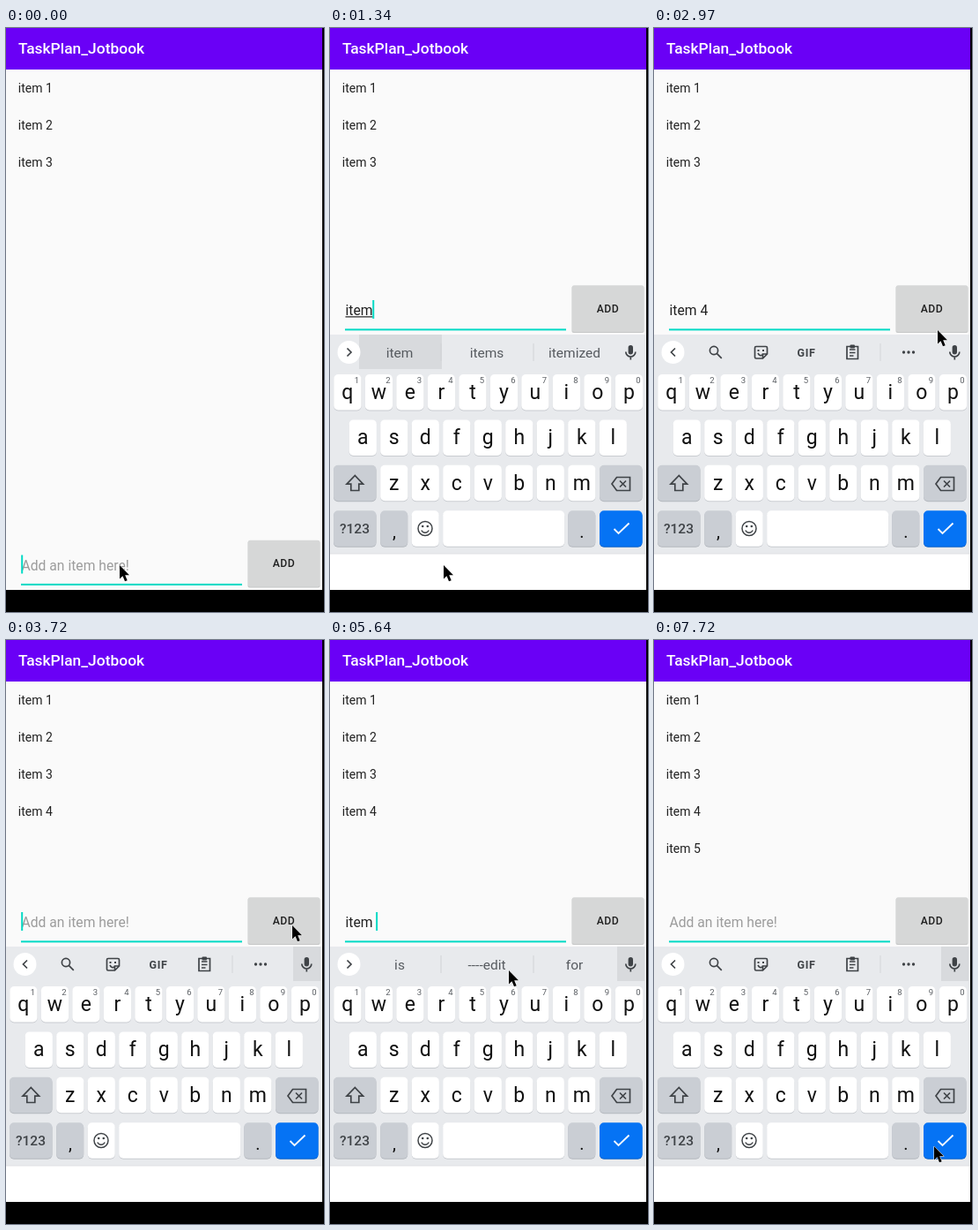
An HTML page that plays this animation: 361 px wide and 661 px high, repeating every 8 s.

```html
<!DOCTYPE html>
<html lang="en">
<head>
<meta charset="utf-8">
<title>Todo list</title>
<style>
  html, body { margin: 0; width: 100%; height: 100%; overflow: hidden; background: #000; }
  svg { display: block; width: 361px; height: 661px; font-family: Roboto, sans-serif; }
  text { white-space: pre; }
  .mid { text-anchor: middle; }
  .line { fill: none; stroke: #3f4347; stroke-width: 1.7; }
</style>
</head>
<body>
<svg id="stage" viewBox="0 0 361 661"></svg>
<script>
const LOOP = 8000;
const stage = document.getElementById('stage');

// Each step changes part of the app state and holds until the next one.
const start = { rows: 3, text: '', mark: 0, words: null, caret: true, keys: false, pick: false, mic: false };
const NEXT = ['is', '----edit', 'for'];
const IT = ['it', "it's", 'if'];
const ITE = ['ite', 'item', "it's"];
const ITEM = ['item', 'items', 'itemized'];
const steps = [
  [150, { keys: true, text: 'i', mark: 1, words: IT, pick: true }],
  [290, { text: 'it', mark: 2 }],
  [440, { text: 'ite' }],
  [740, { mark: 3, words: ITE }],
  [1040, { text: 'item' }],
  [1340, { mark: 4, words: ITEM }],
  [1490, { text: 'item ' }],
  [1640, { mark: 0, words: NEXT }],
  [2240, { text: 'item 4' }],
  [2830, { words: null, pick: false, caret: false }],
  [3420, { rows: 4, text: '', caret: true, mic: true }],
  [4010, { caret: false }],
  [4460, { text: 'i', caret: true }],
  [4750, { text: 'it', mark: 2, words: IT }],
  [4900, { text: 'ite', mark: 3, words: ITE }],
  [5040, { text: 'item' }],
  [5190, { mark: 4, words: ITEM }],
  [5340, { text: 'item ' }],
  [5640, { mark: 0, words: NEXT }],
  [6090, { caret: false }],
  [6390, { text: 'item 5', caret: true }],
  [6830, { words: null }],
  [6980, { caret: false }],
  [7120, { rows: 5, text: '', caret: true }],
  [7720, { caret: false }]
];

// Pointer samples: time, x, y
const moves = [
  [0, 129, 608], [2240, 144, 605], [2380, 184, 562], [2530, 245, 474],
  [2680, 298, 388], [2830, 322, 342], [2980, 329, 326], [3120, 325, 323],
  [3860, 272, 346], [4010, 203, 374], [6540, 222, 363], [6690, 265, 341],
  [6830, 297, 322], [6980, 304, 318], [7270, 310, 352], [7420, 316, 433],
  [7570, 320, 520], [7720, 318, 573]
];

const rect = (x, y, w, h, fill, r = 0, more = '') =>
  `<rect x="${x}" y="${y}" width="${w}" height="${h}" rx="${r}" fill="${fill}" ${more}/>`;
const label = (s, x, y, size, fill, more = '') =>
  `<text x="${x}" y="${y}" font-size="${size}" fill="${fill}" ${more}>${s}</text>`;
const mid = (s, x, y, size, fill, more = '') => label(s, x, y, size, fill, 'class="mid" ' + more);
const line = (d, more = '') => `<path class="line" d="${d}" ${more}/>`;

const key = (x, y, w, fill = '#fff', shade = '#c9ccd1') =>
  rect(x, y + 1, w, 40.5, shade, 5) + rect(x, y, w, 40.5, fill, 5);

function letterRow(chars, x, row) {
  const y = 392 + row * 51.4;
  return [...chars].map((c, i) => {
    const cx = x + i * 35.5;
    const digit = row ? '' : mid((i + 1) % 10, cx + 10.4, 402, 9.5, '#5a5e63');
    return key(cx - 15.6, y, 31.2) + mid(c, cx, y + 27.8, 23, '#111') + digit;
  }).join('');
}

function keyboard() {
  const soft = '#caced4', dark = '#b4b8be', ink = '#3f4347';
  return rect(0, 347, 359, 248, '#e8eaed') +
    rect(0, 595, 359, 41, '#fff') + rect(0, 594.5, 359, 1, '#dfe1e4') +
    rect(33, 347, 94, 39, '#d8dadd', 0, 'id="pick"') +
    rect(326, 347, 31, 39, '#d8dadd', 0, 'id="mic"') +
    '<circle cx="21.5" cy="367" r="13" fill="#fff"/>' +
    line('', 'id="chevron"') +
    // suggestions
    '<g id="words">' + rect(125.5, 357, 1, 20, '#cfd2d6') + rect(230.5, 357, 1, 20, '#cfd2d6') +
    [79, 178, 277.5].map(x => mid('', x, 373, 15.5, '#565a5f')).join('') + '</g>' +
    // toolbar
    '<g id="tools"><circle class="line" cx="68" cy="365" r="4.6"/>' + line('M71.3 368.3l5.5 5.5') +
    line('M116 360.5h11q1.5 0 1.5 1.5v7l-5 5h-7.500q-1.500 0-1.500-1.500v-10.500q0-1.500 1.500-1.500zM128 369h-4.500v4.500M118 368q2 4 5 2') +
    '<path d="M117.500 364h2v2h-2zM123 364h2v2h-2z" fill="#3f4347"/>' +
    mid('GIF', 173, 371.5, 12.5, ink, 'font-weight="700" letter-spacing=".6"') +
    line('M219 360.500h12.500v14h-12.500zM222 364h6.500M222 367.500h6.500M222 371h4.500') +
    rect(222.5, 358.5, 5.5, 4, ink, 1) + rect(256.5, 357, 1, 20, '#d3d6da') +
    [283.5, 289, 294.5].map(x => `<circle cx="${x}" cy="367" r="1.7" fill="${ink}"/>`).join('') + '</g>' +
    // microphone
    rect(338.6, 359, 5.4, 10.5, ink, 2.7) + line('M335.800 366.500a5.500 5.500 0 0 0 11 0M341.300 372v3.500') +
    letterRow('qwertyuiop', 19.9, 0) + letterRow('asdfghjkl', 37.3, 1) + letterRow('zxcvbnm', 72.8, 2) +
    key(4, 494.8, 48.5, soft, dark) + line('M28.300 506.500l-9.300 9.700h4.800v7.300h9v-7.300h4.800z') +
    key(306, 494.8, 48.5, soft, dark) + line('M325.500 508.500h15v15h-15l-5.500-7.500zM329 512.500l7 7M336 512.500l-7 7') +
    key(4, 546.2, 48.5, soft, dark) + mid('?123', 28, 572, 15.5, ink, 'font-weight="500"') +
    key(57.2, 546.2, 31, soft, dark) + mid(',', 73, 577, 20, '#111') +
    key(92.7, 546.2, 31) + '<circle class="line" cx="108" cy="566.500" r="8" style="stroke-width:1.500"/>' +
    '<circle cx="105.200" cy="564" r="1.300" fill="#3f4347"/><circle cx="110.800" cy="564" r="1.300" fill="#3f4347"/>' +
    line('M103.800 568.500a4.600 4.600 0 0 0 8.400 0', 'style="stroke-width:1.400"') +
    key(128.2, 546.2, 138) +
    key(270.3, 546.2, 31, soft, dark) + mid('.', 286, 577, 20, '#111') +
    key(306, 546.2, 48.5, '#0573f4', '#075fc6') +
    '<path d="M322.500 567l5 5 12-11.500" fill="none" stroke="#fff" stroke-width="1.800"/>';
}

stage.innerHTML =
  rect(0, 0, 361, 661, '#000') + rect(0, 0, 359, 636, '#fafafa') + rect(0, 0, 359, 47, '#6a00f6') +
  label('TaskPlan_Jotbook', 14, 29, 17.4, '#fff', 'font-weight="500"') +
  '<g id="rows">' + [1, 2, 3, 4, 5].map(n => label('item ' + n, 13.8, 31 + n * 42, 14, '#212121')).join('') + '</g>' +
  '<g id="keys">' + keyboard() + '</g>' +
  '<g id="form">' +
  label('', 17.5, 325, 15.7, '#212121', 'id="field"') +
  rect(17.5, 326.3, 0, 1.2, '#212121', 0, 'id="mark"') +
  rect(17, 340.4, 251, 2, '#03dac5') +
  rect(0, 308, 2, 21, '#03dac5', 0, 'id="caret"') +
  rect(274.5, 292, 82, 53, '#c6c7c7', 2) + rect(275, 291.3, 81, 52.7, '#d6d7d7', 2) +
  mid('ADD', 315.5, 321.6, 12.2, '#212121', 'font-weight="500" letter-spacing=".5"') + '</g>' +
  '<path id="pointer" d="M0 0v15.500l3.500-3.200 2.500 6 2.700-1.100-2.500-5.900h4.800z" fill="#000" stroke="#fff" stroke-width="1" paint-order="stroke"/>';

const ui = {};
stage.querySelectorAll('[id]').forEach(el => { ui[el.id] = el; });
const wordEls = ui.words.querySelectorAll('text');
const pen = document.createElement('canvas').getContext('2d');
pen.font = '15.7px Roboto, sans-serif';
const widthOf = s => pen.measureText(s).width;
const show = (el, on) => el.setAttribute('display', on ? 'inline' : 'none');

function draw(t) {
  const s = Object.assign({}, start);
  for (const [at, change] of steps) if (at <= t) Object.assign(s, change);

  [...ui.rows.children].forEach((el, i) => show(el, i < s.rows));
  show(ui.keys, s.keys);
  show(ui.pick, s.pick);
  show(ui.mic, s.mic);
  show(ui.words, s.words);
  show(ui.tools, !s.words);
  if (s.words) wordEls.forEach((el, i) => { el.textContent = s.words[i]; });
  ui.chevron.setAttribute('d', s.words ? 'M19.500 362.500l4.500 4.500-4.500 4.500' : 'M24 362.500l-4.500 4.500 4.500 4.500');

  ui.form.setAttribute('transform', `translate(0 ${s.keys ? 0 : 288.5})`);
  ui.field.textContent = s.text || 'Add an item here!';
  ui.field.setAttribute('fill', s.text ? '#212121' : '#9c9c9c');
  ui.mark.setAttribute('width', widthOf(s.text.slice(0, s.mark)));
  ui.caret.setAttribute('x', 17.2 + widthOf(s.text));
  show(ui.caret, s.caret);

  const [, x, y] = moves.filter(m => m[0] <= t).pop();
  ui.pointer.setAttribute('transform', `translate(${x} ${y})`);
}

const begin = performance.now();
function tick() {
  draw((performance.now() - begin) % LOOP);
  requestAnimationFrame(tick);
}
draw(0);
requestAnimationFrame(tick);
</script>
</body>
</html>
```
